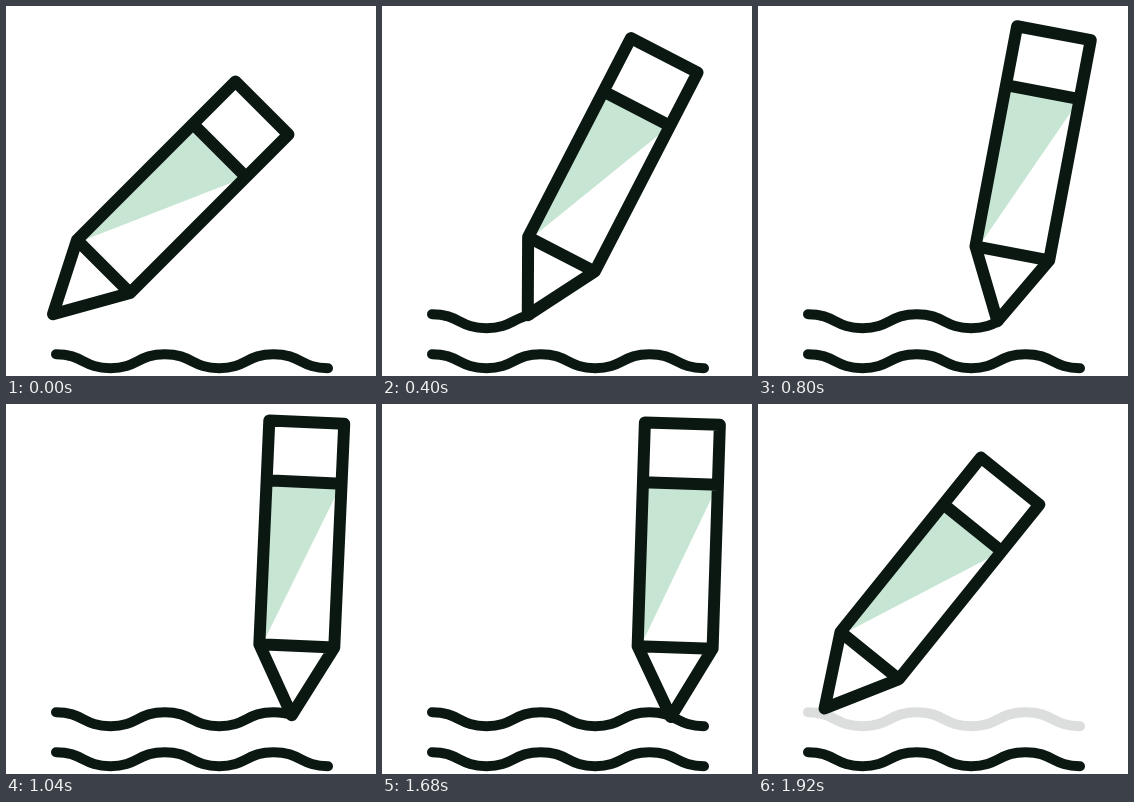
Recreate the animation shown at these times as an HTML page. Size 370 px wide and 370 px high, loop 1960 ms.

```html
<!DOCTYPE html>
<html lang="en">
<head>
<meta charset="utf-8">
<title>Writing pencil</title>
<style>
  html, body { margin: 0; width: 100%; height: 100%; overflow: hidden; background: #fff; }
  svg { display: block; width: 100%; height: 100%; }
  .ink { fill: none; stroke: #0b1812; stroke-linecap: round; stroke-linejoin: round; }
</style>
</head>
<body>
<svg viewBox="0 0 370 370">
  <defs>
    <path id="wave" d="M50 308.2c27.2 0 27.2 14 54.4 14s27.2-14 54.4-14 27.2 14 54.4 14 27.2-14 54.4-14 27.2 14 54.4 14"/>
  </defs>
  <g class="ink" stroke-width="10">
    <use href="#wave" y="40"/>
    <use href="#wave" id="line"/>
  </g>
  <!-- The pencil's tip is its origin -->
  <g id="pencil">
    <path fill="#c6e5d2" d="M-35.5-233.5h75L-32.5-69.5h-3z"/>
    <path class="ink" stroke-width="12" d="M0 0L-35.5-69.5V-293.5h75V-69.5zM-35.5-69.5h75M-35.5-233.5h75"/>
  </g>
</svg>
<script>
  const [wave, line, pencil] = ['wave', 'line', 'pencil'].map(id => document.getElementById(id));
  const LOOP = 1960, STEP = 40, DRAW_END = 1440, LIFT = 1642, FADE = 1680;
  const START = { x: 47, y: 308.2, angle: 45 };
  const END = { x: 322, y: 322.2, angle: -4 };
  const length = wave.getTotalLength();
  const mix = (a, b, k) => a + (b - a) * k;

  // Steady speed that eases to a stop
  const glide = p => p * (4.3 - p ** 3.3) / 3.3;

  function writing(t) {
    const f = glide(Math.min(t / DRAW_END, 1));
    const point = wave.getPointAtLength(f * length);
    return { f, x: point.x - 3 * (1 - f), y: point.y, angle: mix(START.angle, END.angle, f) };
  }

  function returning(t) {
    const p = (t - LIFT) / (LOOP - LIFT);
    const k = p + 0.65 * p ** 3 * (1 - p);
    return {
      f: 1,
      x: mix(END.x, START.x, k),
      y: mix(END.y, START.y, k) - 72 * k * (1 - k),
      angle: mix(END.angle, START.angle, p)
    };
  }

  function draw(now) {
    const t = Math.floor(now % LOOP / STEP) * STEP;
    const { f, x, y, angle } = t < LIFT ? writing(t) : returning(t);
    pencil.setAttribute('transform', `translate(${x} ${y}) rotate(${angle})`);
    line.style.strokeDasharray = f < 1 ? `${f * length} 999` : 'none';
    line.style.opacity = f && Math.min(1, (LOOP - t) / (LOOP - FADE));
  }

  let begin;
  function tick(now) {
    begin ??= now;
    draw(now - begin);
    requestAnimationFrame(tick);
  }
  draw(0);
  requestAnimationFrame(tick);
</script>
</body>
</html>
```
